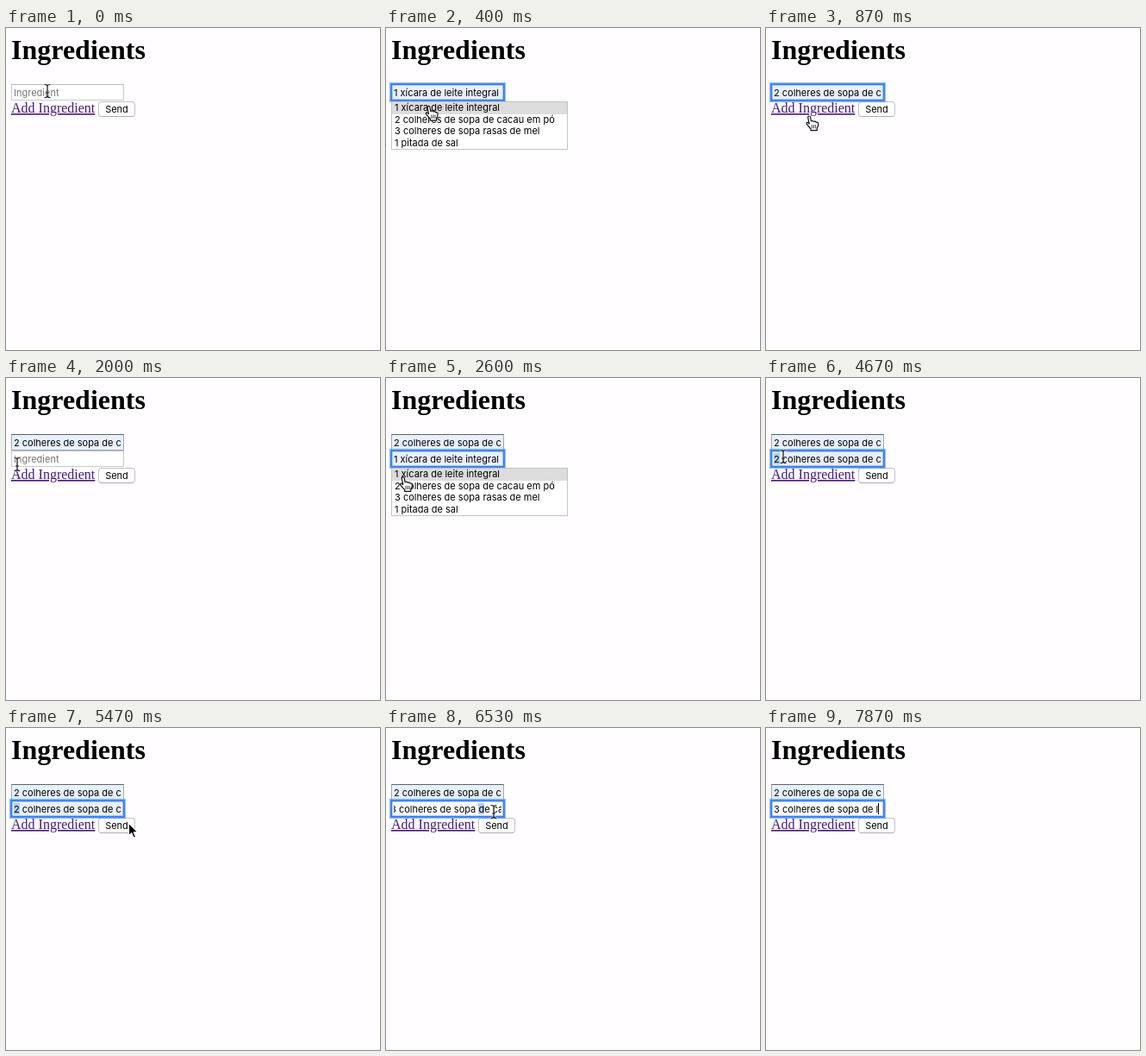
Write an HTML page that moves like this. It is 434 px wide and 373 px high and loops after 8000 ms.

```html
<!DOCTYPE html>
<html lang="en">
<head>
<meta charset="utf-8">
<title>Ingredients</title>
<style>
  html, body { margin: 0; width: 100%; height: 100%; overflow: hidden; background: #fffdff; }
  body { position: relative; font: 11px/18px Inter, "Open Sans", sans-serif; color: #000; }
  svg { position: absolute; left: 0; top: 0; overflow: visible; }
  svg text { font-family: "Liberation Serif", "Times New Roman", serif; }
  .field, .send, .popup { position: absolute; box-sizing: border-box; white-space: pre; }
  .field {
    left: 6px; width: 131px; height: 19px; background: #fff;
    border: 1px solid #cbc9cb; border-top-color: #bcbabc;
  }
  .field.auto { background: #e8f0fe; border-color: #a4a8b0; border-top-color: #5f6268; }
  .field.focus {
    z-index: 1; border-color: #3d7fe8;
    box-shadow: 0 0 0 1px #4a8af0, 0 0 1px 2px rgba(90, 150, 245, .6), inset 0 0 0 .5px #6ba0f2;
  }
  .value { position: absolute; left: 2px; top: 0; width: 125px; height: 17px; overflow: hidden; }
  .line { position: absolute; left: 0; top: 0; }
  .sel { background: #b0cdf3; display: inline-block; height: 13px; line-height: 14px; }
  .caret { position: absolute; width: 1px; height: 13px; top: 2px; background: #000; }
  .empty .line { color: #757575; }
  .send {
    left: 107px; top: 85px; width: 43px; height: 18px; border: 1px solid #c4c2c4;
    border-bottom-color: #aeacae; border-radius: 4px; background: #fff; text-align: center; line-height: 17px;
  }
  .popup {
    left: 6px; width: 205px; z-index: 2; background: #fff; border: 1px solid #c3c3c3;
    line-height: 13.5px; overflow: hidden;
  }
  .popup div { height: 13.5px; padding-left: 3px; }
  .popup .hot { background: #dcdcdc; }
  #mouse { z-index: 3; }
  #mouse path { stroke-linejoin: round; stroke-linecap: round; }
</style>
</head>
<body>
<svg width="434" height="60"><text x="6" y="36" font-size="32" font-weight="700">Ingredients</text></svg>
<div id="actions">
  <svg width="110" height="110"><text x="6" y="98" font-size="16" fill="#45187c" text-decoration="underline">Add Ingredient</text></svg>
  <div class="send">Send</div>
</div>
<div id="popup" class="popup"></div>
<svg id="mouse" width="20" height="20">
  <g id="beam" fill="none">
    <path d="M-3-7.5Q0-7.5 0-5.5Q0-7.5 3-7.5M0-5.5V5.5M-3 7.5Q0 7.5 0 5.5Q0 7.5 3 7.5M-1.5 2H1.5" stroke="#fff" stroke-width="2.6" opacity=".7"/>
    <path d="M-3-7.5Q0-7.5 0-5.5Q0-7.5 3-7.5M0-5.5V5.5M-3 7.5Q0 7.5 0 5.5Q0 7.5 3 7.5M-1.5 2H1.5" stroke="#111" stroke-width="1.2"/>
  </g>
  <g id="hand">
    <path d="M-1.4 1.2Q-1.4 0 0 0T1.6 1.4L2.4 6Q4.4 4.8 5.4 6.5Q7.3 5.6 8.1 7.2Q10.6 6.8 10.7 9.2Q10.8 12 9.2 14.2V16.7H2V14.8Q-.4 12.6-2.9 9.2Q-3.4 7.3-1.8 7.4L.1 9Z" fill="#fff" stroke="#111" stroke-width="1.2"/>
    <path d="M3.4 10.5V14M5.5 10.5V14M7.6 10.5V14" stroke="#111" stroke-width=".8"/>
  </g>
  <path id="arrow" d="M0 0V14.4L3.3 11.3L5.7 17L8.1 16L5.7 10.5H10.4Z" fill="#000" stroke="#fff" stroke-width="1.1"/>
</svg>
<script>
const LOOP = 8000, ROW = 13.5, FILL = "2 colheres de sopa de cacau em pó";
const ITEMS = ["1 xícara de leite integral", FILL, "3 colheres de sopa rasas de mel", "1 pitada de sal"];
const $ = id => document.getElementById(id);

// time, x, y, pointer kind held until the next key
const PATH = [
  [0, 48, 73, "beam"], [130, 48, 73, "beam"], [290, 49, 84, "hand"], [600, 50, 102, "hand"],
  [930, 50, 102, "hand"], [1270, 48, 94, "hand"], [1470, 48, 94, "beam"], [1540, 48, 94, "beam"],
  [2000, 13, 100, "beam"], [2270, 13, 100, "beam"], [2450, 16, 105, "hand"], [2700, 22, 121, "arrow"],
  [3000, 27, 128, "arrow"], [3270, 27, 128, "arrow"], [3450, 27, 121, "hand"], [3800, 24, 103, "hand"],
  [4000, 24, 103, "beam"], [4130, 18, 92, "beam"], [4270, 4, 92, "beam"], [4669, 4, 92, "beam"],
  [4670, 20, 91, "beam"], [4730, 20, 91, "beam"], [4950, 115, 95, "beam"], [5070, 139, 99, "arrow"],
  [5270, 139, 99, "arrow"], [5450, 143, 112, "arrow"], [5650, 138, 96, "beam"], [5850, 122, 83, "beam"],
  [6070, 108, 95, "beam"], [6500, 108, 95, "beam"], [6530, 125, 97, "beam"], [6590, 125, 97, "beam"],
  [6800, 142, 87, "beam"], [7000, 142, 87, "none"]
];

function mouseAt(t) {
  let i = PATH.length - 1;
  while (PATH[i][0] > t) i--;
  const a = PATH[i], b = PATH[i + 1] || a;
  const k = b === a ? 0 : (t - a[0]) / (b[0] - a[0]);
  return { x: a[1] + (b[1] - a[1]) * k, y: a[2] + (b[2] - a[2]) * k, kind: a[3] };
}

function add(parent, cls, text = "") {
  const el = document.createElement("div");
  el.className = cls;
  el.textContent = text;
  parent.appendChild(el);
  return el;
}

function makeField(top) {
  const box = add(document.body, "field");
  box.style.top = top + "px";
  const line = add(add(box, "value"), "line");
  return { box, line };
}
const first = makeField(65), second = makeField(84);

function draw(field, s) {
  const { text = "", sel, auto, focus, scroll = 0, caret = -1 } = s;
  const empty = !text;
  field.box.className = "field" + (auto ? " auto" : "") + (focus ? " focus" : "") + (empty ? " empty" : "");
  const key = JSON.stringify(s);
  if (field.key === key) return;
  field.key = key;
  const line = field.line;
  line.textContent = "";
  line.style.left = -scroll + "px";
  const span = (str, cls = "") => {
    const el = document.createElement("span");
    el.className = cls;
    el.textContent = str;
    line.appendChild(el);
    return el;
  };
  if (empty) span("Ingredient");
  else if (sel) {
    span(text.slice(0, sel[0]));
    span(text.slice(sel[0], sel[1]), "sel");
    span(text.slice(sel[1]));
  } else {
    const head = span(text.slice(0, Math.max(caret, 0)));
    span(text.slice(Math.max(caret, 0)));
    if (caret >= 0) add(line, "caret").style.left = Math.min(head.offsetWidth, 124) + "px";
    return;
  }
  if (caret >= 0) add(line, "caret").style.left = "0px";
}

function drawPopup(top, items, hot) {
  const p = $("popup");
  p.style.display = items.length ? "block" : "none";
  p.style.top = top + "px";
  p.style.height = items.length * ROW + 2 + "px";
  const key = items.join() + hot;
  if (p.key === key) return;
  p.key = key;
  p.textContent = "";
  items.forEach((s, i) => add(p, i === hot ? "hot" : "", s));
}

const blink = (t, since) => (t - since) % 1000 < 500;

// An input while its suggestion list is open
function choosing(t, since, hot) {
  return hot < 0 ? { focus: true, caret: blink(t, since) ? 0 : -1 }
                 : { text: ITEMS[hot], auto: true, focus: true };
}

function editing(t) {
  if (t < 3130) return null;
  if (t < 5630) {
    const s = { text: FILL, auto: true, focus: true };
    if (t >= 4200) s.sel = [0, 1];
    else if (t >= 4100) s.caret = 1;
    return s;
  }
  const cut = "3 colheres de sopa ", full = "3" + FILL.slice(1);
  if (t < 6530) return { text: full, focus: true, caret: blink(t, 5630) ? 1 : -1 };
  if (t < 7000) {
    const n = Math.min(full.length, cut.length + 1 + Math.floor((t - 6530) / 67) * 3);
    return { text: full, focus: true, sel: [cut.length, n], scroll: 4 };
  }
  const keys = [7470, 7570, 7670, 7870].filter(k => t >= k);
  const text = cut + "de l".slice(0, keys.length);
  const last = keys.length ? keys[keys.length - 1] : 7000;
  return { text, focus: true, caret: blink(t, last) ? text.length : -1 };
}

function render(t) {
  const m = mouseAt(t), added = t >= 1470;
  const openA = t >= 130 && t < 870, openB = t >= 2270 && t < 3130;
  const top = openA ? 85 : 104;
  const hot = openA || openB ? Math.floor((m.y - top - 1) / ROW) : -1;

  draw(first, t < 130 ? {} : openA ? choosing(t, 130, hot) : { text: FILL, auto: true, focus: !added });
  second.box.style.display = added ? "block" : "none";
  if (added) draw(second, openB ? choosing(t, 2270, hot) : editing(t) || {});
  $("actions").style.transform = added ? "translateY(19px)" : "none";

  const match = t >= 7000 && t < 7470;
  drawPopup(top, openA || openB ? ITEMS : match ? [ITEMS[2]] : [], hot);

  for (const k of ["beam", "hand", "arrow"]) $(k).style.display = m.kind === k ? "" : "none";
  $("mouse").style.transform = `translate(${m.x}px, ${m.y}px)`;
}

function tick(now) {
  render(now % LOOP);
  requestAnimationFrame(tick);
}
render(0);
requestAnimationFrame(tick);
</script>
</body>
</html>
```
